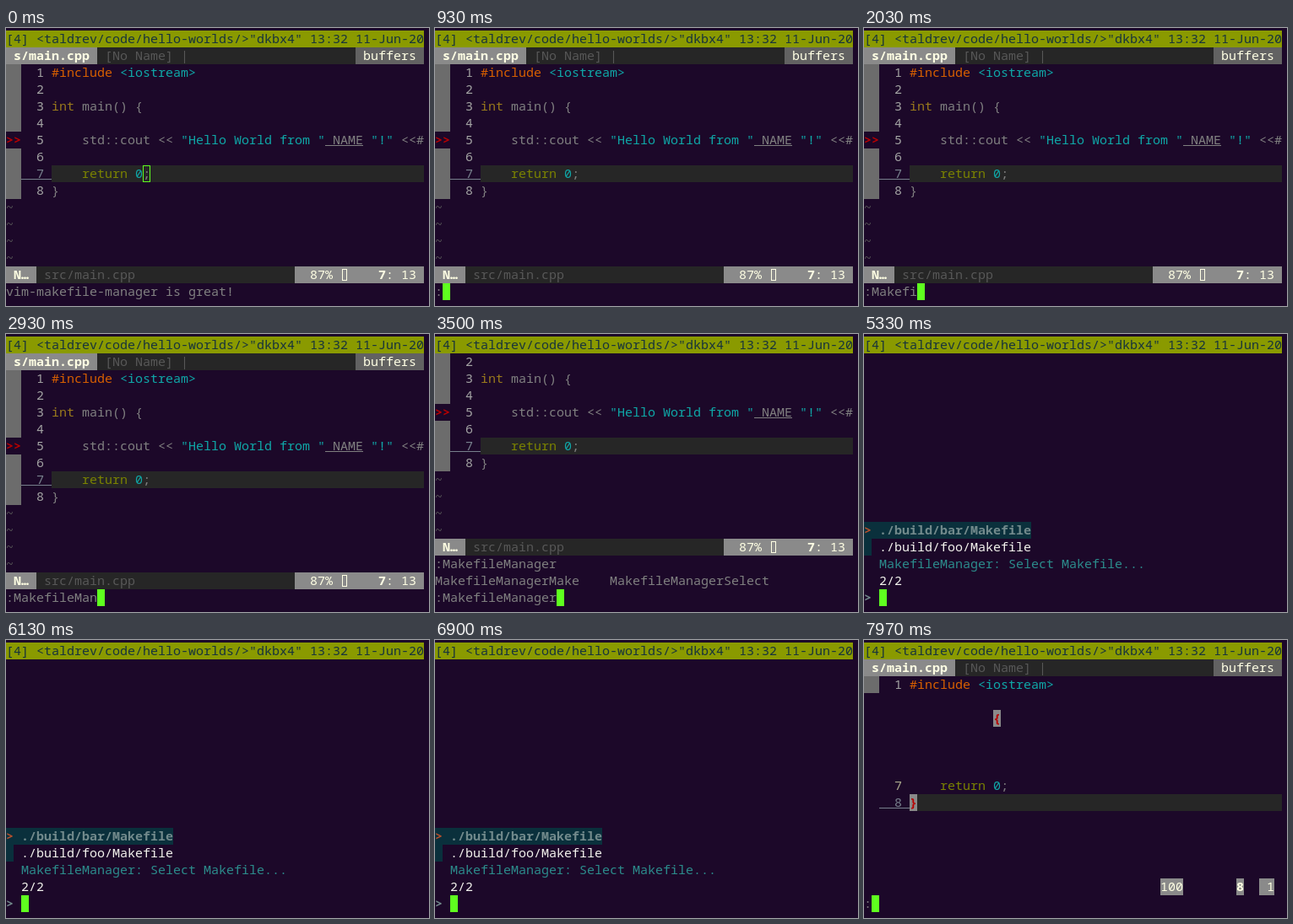
Animation, 501 px wide and 330 px high, one loop 8000 ms. Source, as an HTML page:

```html
<!DOCTYPE html>
<html lang="en">
<head>
<meta charset="utf-8">
<title>Terminal session</title>
<style>
  html, body { margin: 0; width: 100%; height: 100%; overflow: hidden; background: #1c0829; }
  svg { display: block; width: 501px; height: 330px; }
  text { font: 15px "Noto Sans Mono", "DejaVu Sans Mono", monospace; white-space: pre; }
  .b { font-weight: 700; }
</style>
</head>
<body>
<svg id="stage" viewBox="0 0 501 330"></svg>
<script>
const LOOP = 8000, CW = 9, RH = 20, TOP = 3, COLS = 55;
const C = {
  bar: '#8a9a00', barText: '#17333c', dark: '#262626', panel: '#8a8a8a', side: '#6c6c6c',
  tab: '#626262', cream: '#ffffe4', dim: '#585858', fg: '#808080', num: '#a3a3a3',
  cur: '#77808c', orange: '#d75f00', cyan: '#0fa8a8', type: '#9a7a1c', key: '#7b8300',
  red: '#b80000', green: '#5fff1f', pick: '#0a303c', slate: '#728a8c', teal: '#2c8c8c', white: '#f4f4ee'
};
const stage = document.getElementById('stage');
const esc = s => s.replace(/&/g, '&amp;').replace(/</g, '&lt;').replace(/>/g, '&gt;');

const fill = (row, col, n, color, rows = 1) =>
  `<rect x="${col * CW}" y="${TOP + row * RH}" width="${n * CW}" height="${rows * RH}" fill="${color}"/>`;
const put = (row, col, s, color = C.fg, bold = false) =>
  `<text x="${col * CW}" y="${18 + row * RH}" fill="${color}"${bold ? ' class="b"' : ''}>${esc(s)}</text>`;
const rule = (row, col, n, color) =>
  `<rect x="${col * CW}" y="${19 + row * RH}" width="${n * CW}" height="1" fill="${color}"/>`;
const block = (row, col) => fill(row, col, 1, C.green);
const hollow = (row, col) =>
  `<rect x="${col * CW + .5}" y="${TOP + row * RH + .5}" width="8" height="19" fill="none" stroke="${C.green}"/>`;
const boxed = (row, col, s, color = C.cream, bold = true) =>
  fill(row, col, s.length, C.panel) + put(row, col, s, color, bold);

const topBar = () => fill(0, 0, COLS, C.bar) +
  put(0, 0, '[4] <taldrev/code/hello-worlds/>"dkbx4" 13:32 11-Jun-20', C.barText);

const tabs = () => fill(1, 0, COLS, C.dark) + fill(1, 0, 12, C.panel) + fill(1, 46, 9, C.tab) +
  put(1, 1, 's/main.cpp', C.cream, true) + put(1, 13, '[No Name] |', C.dim) +
  put(1, 47, 'buffers', C.cream);

// Each source line is a list of [column, text, colour].
const code = [
  [[6, '#include', C.orange], [15, '<iostream>', C.cyan]],
  [],
  [[6, 'int', C.type], [10, 'main() {', C.fg]],
  [],
  [[10, 'std::cout <<', C.fg], [23, '"Hello World from "', C.cyan], [43, 'NAME', C.fg],
   [48, '"!"', C.cyan], [52, '<<#', C.fg]],
  [],
  [[10, 'return', C.key], [17, '0', C.cyan], [18, ';', C.fg]],
  [[6, '}', C.fg]]
];
const source = (n, row) => code[n - 1].map(([col, s, color]) => put(row, col, s, color)).join('');

function codeLine(n, row) {
  const current = n === 7;
  let out = n === 5 ? put(row, 0, '>>', C.red, true) : fill(row, 0, 2, C.side);
  if (current) out += fill(row, 6, 49, C.dark) + rule(row, 2, 4, C.cur);
  if (n === 5) out += rule(row, 42, 5, C.fg);
  return out + put(row, 4, String(n), current ? C.cur : C.num) + source(n, row);
}

const statusLine = row => fill(row, 0, COLS, C.dark) + fill(row, 0, 4, C.panel) + fill(row, 38, 17, C.panel) +
  put(row, 1, 'N…', C.cream, true) + put(row, 5, 'src/main.cpp', C.dim) + put(row, 40, '87%', C.cream) +
  `<rect x="398.5" y="${6.5 + row * RH}" width="5" height="13" fill="none" stroke="${C.cream}"/>` +
  put(row, 49, '7', C.cream, true) + put(row, 50, ': 13', C.cream);

function editor(scroll) {
  let out = scroll ? '' : tabs();
  for (let n = 1; n <= 8; n++) if (n + 1 - scroll > 0) out += codeLine(n, n + 1 - scroll);
  for (let r = 10; r < 14; r++) out += put(r - scroll, 0, '~', C.dim);
  return out + statusLine(14 - scroll);
}

const prompt = s => put(15, 0, s) + block(15, s.length);

const picker = () => fill(11, 0, 22, C.pick) + fill(12, 0, 1, C.pick) +
  put(11, 0, '>', '#b9502c', true) + put(11, 2, './build/bar/Makefile', C.slate, true) +
  put(12, 2, './build/foo/Makefile', C.white) +
  put(13, 2, 'MakefileManager: Select Makefile...', C.teal) +
  put(14, 2, '2/2', C.white) + put(15, 0, '>', C.slate, true) + block(15, 2);

const restored = () => tabs() + fill(2, 0, 2, C.side) + put(2, 4, '1', C.num) + source(1, 2);

const lastLine = () => boxed(4, 17, '{', C.red) +
  put(8, 4, '7', '#aaa88c') + source(7, 8) +
  fill(9, 6, 49, C.dark) + rule(9, 2, 4, C.cur) + put(9, 4, '8', C.cur) + boxed(9, 6, '}', C.red) +
  boxed(14, 39, '100', C.cream, false) + boxed(14, 49, '8') + boxed(14, 52, ' 1', C.cream, false);

const typing = { start: 930, step: 180, text: ':MakefileMan' };
const at = { list: 3120, letter: 3560, done: 3840, picker: 4560, back: 7200, bottom: 7560, colon: 7900 };

function scene(t) {
  if (t < typing.start) return editor(0) + hollow(8, 18) + put(15, 0, 'vim-makefile-manager is great!');
  if (t < at.list) {
    const n = 1 + Math.floor((t - typing.start) / typing.step);
    return editor(0) + prompt(typing.text.slice(0, n));
  }
  if (t < at.picker) {
    const tail = t < at.letter ? '' : t < at.done ? 'S' : 'Select';
    return editor(2) + put(13, 0, ':MakefileManager') + put(14, 0, 'MakefileManagerMake') +
      put(14, 23, 'MakefileManagerSelect') + prompt(':MakefileManager' + tail);
  }
  if (t < at.back) return picker();
  if (t < at.bottom) return restored() + hollow(8, 18);
  return restored() + lastLine() + (t < at.colon ? hollow(9, 6) : prompt(':'));
}

let shown = '';
function draw(now) {
  const next = topBar() + scene(now % LOOP);
  if (next !== shown) stage.innerHTML = shown = next;
}

const begin = performance.now();
function tick() {
  draw(performance.now() - begin);
  requestAnimationFrame(tick);
}
tick();
</script>
</body>
</html>
```
